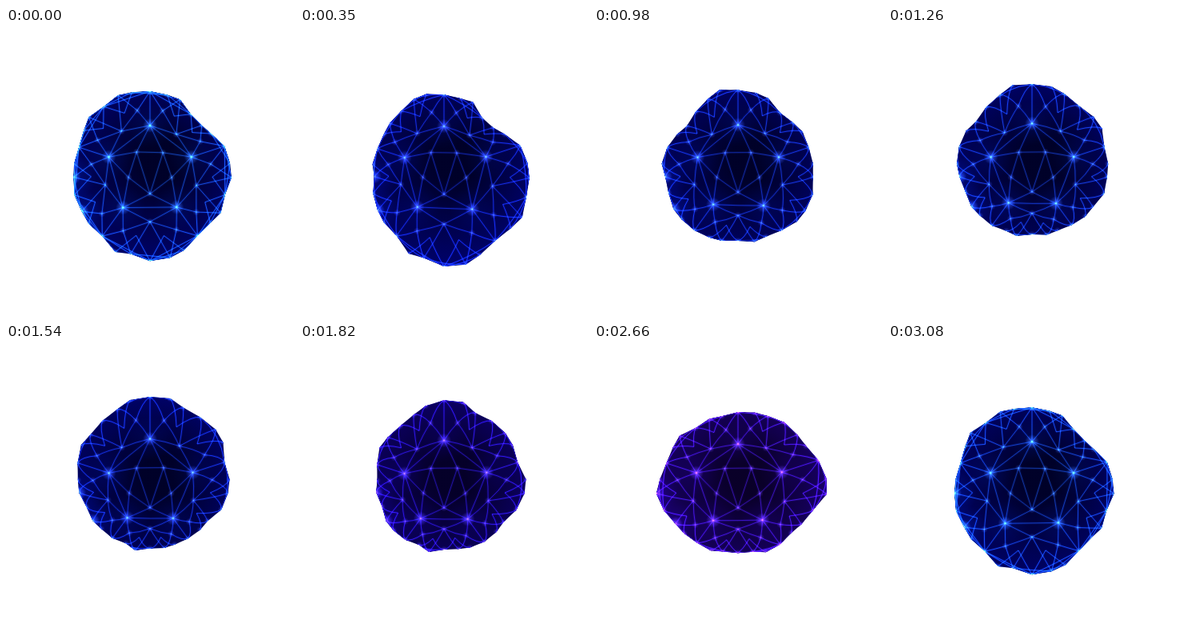
An HTML page with a canvas that plays this animation: 360x360 px, repeating every 3150 ms.

```html
<!DOCTYPE html>
<html>
<head>
<meta charset="utf-8">
<style>
html, body { margin: 0; width: 100%; height: 100%; overflow: hidden; background: #fff; }
canvas { display: block; }
</style>
</head>
<body>
<canvas id="stage" width="360" height="360"></canvas>
<script>
const ctx = document.getElementById('stage').getContext('2d');
const LOOP = 3150, STEP = 70, CX = 180, CY = 178, SIZE = 96, TAU = 2 * Math.PI;

// Key poses: time, hue, then the silhouette radius every 45 degrees, clockwise from the right
const poses = [
  [0,    217, 102, 104, 113, 106,  95, 102, 102,  89],
  [630,  243, 113, 117, 118,  98,  85,  84,  97,  82],
  [980,  227,  98,  97,  90,  93,  95,  88, 105,  91],
  [1540, 228, 101,  81,  81,  79,  92, 101, 114, 107],
  [2170, 270, 105,  94,  86,  90,  82,  84,  98,  90],
  [2660, 254, 110,  91,  84,  92, 101,  95,  93, 101]
];

// A dodecahedron seen face-on, with a pentagram in every face.
// Rings of joints: a, c, d, f are pentagram crossings, b and e are corners.
const ring = { a: 28, b: 54, c: 58, d: 74, e: 94, f: 95 };
const nodes = [], index = {}, edges = [], seen = new Set();

function node(back, name, degrees) {
  const az = (degrees + 360) % 360, key = back + name + az;
  if (!(key in index)) {
    index[key] = nodes.length;
    nodes.push({
      back, r: ring[name], angle: az / 360 * TAU, depth: ring[name] / SIZE,
      star: !back && (name === 'b' || name === 'f' && (az === 149 || az === 175))
    });
  }
  return index[key];
}

function join(i, j) {
  const key = Math.min(i, j) + '-' + Math.max(i, j);
  const hidden = [i, j].some(n => nodes[n].back && nodes[n].r < ring.d);
  if (hidden || seen.has(key)) return;
  seen.add(key);
  edges.push([i, j]);
}

function face(corners, inner) {
  for (let k = 0; k < 5; k++) {
    const next = (k + 1) % 5;
    join(corners[k], corners[next]);
    join(corners[k], inner[k]);
    join(corners[next], inner[k]);
    join(inner[k], inner[next]);
  }
  join(inner[0], inner[2]);
  join(inner[0], inner[3]);
}

for (const back of [0, 1]) {
  const turns = [0, 1, 2, 3, 4].map(k => 54 + 72 * k + 36 * back);
  face(turns.map(t => node(back, 'b', t)), turns.map(t => node(back, 'a', t + 36)));
  for (const t of turns) {
    const az = t + 36;
    const at = (name, offset) => node(back, name, az + offset);
    face(
      [at('b', -36), at('b', 36), at('e', 36), node(1 - back, 'e', az), at('e', -36)],
      [at('c', 0), at('d', 24), at('f', 13), at('f', -13), at('d', -24)]
    );
  }
}
const outline = nodes.filter(n => n.r >= ring.e).sort((p, q) => p.angle - q.angle);

// Smooth cyclic interpolation through the poses
function poseAt(t) {
  const count = poses.length;
  const pose = i => poses[(i + count) % count];
  const time = i => pose(i)[0] + Math.floor(i / count) * LOOP;
  let k = count - 1;
  while (time(k) > t) k--;
  const h = time(k + 1) - time(k), u = (t - time(k)) / h;
  const u2 = u * u, u3 = u2 * u;
  return pose(k).map((p, i) => {
    const q = pose(k + 1)[i];
    const m = (q - pose(k - 1)[i]) / (time(k + 1) - time(k - 1)) * h;
    const n = (pose(k + 2)[i] - p) / (time(k + 2) - time(k)) * h;
    return p * (2 * u3 - 3 * u2 + 1) + m * (u3 - 2 * u2 + u) + q * (3 * u2 - 2 * u3) + n * (u3 - u2);
  }).slice(1);
}

function radiusAt(radii, angle) {
  const a = angle / TAU * 8, i = Math.floor(a);
  const ease = (1 - Math.cos((a - i) * Math.PI)) / 2;
  return radii[i % 8] + (radii[(i + 1) % 8] - radii[i % 8]) * ease;
}

const hsl = (h, l, a = 1) => `hsla(${h},100%,${l}%,${a})`;

function glow({ x, y }, r, hue, light, peak) {
  const g = ctx.createRadialGradient(x, y, 0, x, y, r);
  g.addColorStop(0, hsl(hue, light, peak));
  g.addColorStop(.3, hsl(hue, light, peak * .4));
  g.addColorStop(1, hsl(hue, light, 0));
  ctx.fillStyle = g;
  ctx.fillRect(x - r, y - r, 2 * r, 2 * r);
}

function draw(t) {
  const [hue, ...radii] = poseAt(t);
  const phase = t / LOOP * TAU, bulge = .14 * Math.sin(phase / 2);
  const fillHue = Math.max(hue, 239);
  nodes.forEach((n, i) => {
    const swell = 1 + n.depth * (radiusAt(radii, n.angle) / SIZE - 1);
    const wobble = 1 + .03 * n.depth ** 3 * Math.sin(phase + i * 2.4);
    n.x = CX + n.r * swell * wobble * Math.cos(n.angle);
    n.y = CY + n.r * swell * wobble * Math.sin(n.angle);
  });

  ctx.clearRect(0, 0, 360, 360);
  ctx.save();
  ctx.beginPath();
  outline.forEach(n => ctx.lineTo(n.x, n.y));
  ctx.closePath();
  const body = ctx.createRadialGradient(195, 165, 25, CX, CY, 112);
  body.addColorStop(0, hsl(fillHue, 8));
  body.addColorStop(1, hsl(fillHue, 20));
  ctx.fillStyle = body;
  ctx.fill();
  ctx.clip();
  ctx.globalCompositeOperation = 'lighter';

  for (const [i, j] of edges) {
    const a = nodes[i], b = nodes[j], depth = (a.depth + b.depth) / 2;
    const mx = (a.x + b.x) / 2, my = (a.y + b.y) / 2, push = bulge * depth ** 3;
    ctx.beginPath();
    ctx.moveTo(a.x, a.y);
    ctx.quadraticCurveTo(mx + (mx - CX) * push, my + (my - CY) * push, b.x, b.y);
    ctx.strokeStyle = hsl(hue, 55, .08);
    ctx.lineWidth = 3;
    ctx.stroke();
    ctx.strokeStyle = hsl(hue, 57, .4 + .3 * depth * depth);
    ctx.lineWidth = .9;
    ctx.stroke();
  }
  for (const n of nodes) {
    if (n.back && n.r < ring.e) continue;
    glow(n, n.star ? 9 : 4.5, hue, 68, n.star ? .85 : .55);
    if (n.star) glow(n, 28, hue, 50, .25 * n.depth);
  }
  ctx.restore();
}

function frame(now) {
  draw(Math.floor(now % LOOP / STEP) * STEP);
  requestAnimationFrame(frame);
}
requestAnimationFrame(frame);
</script>
</body>
</html>
```
